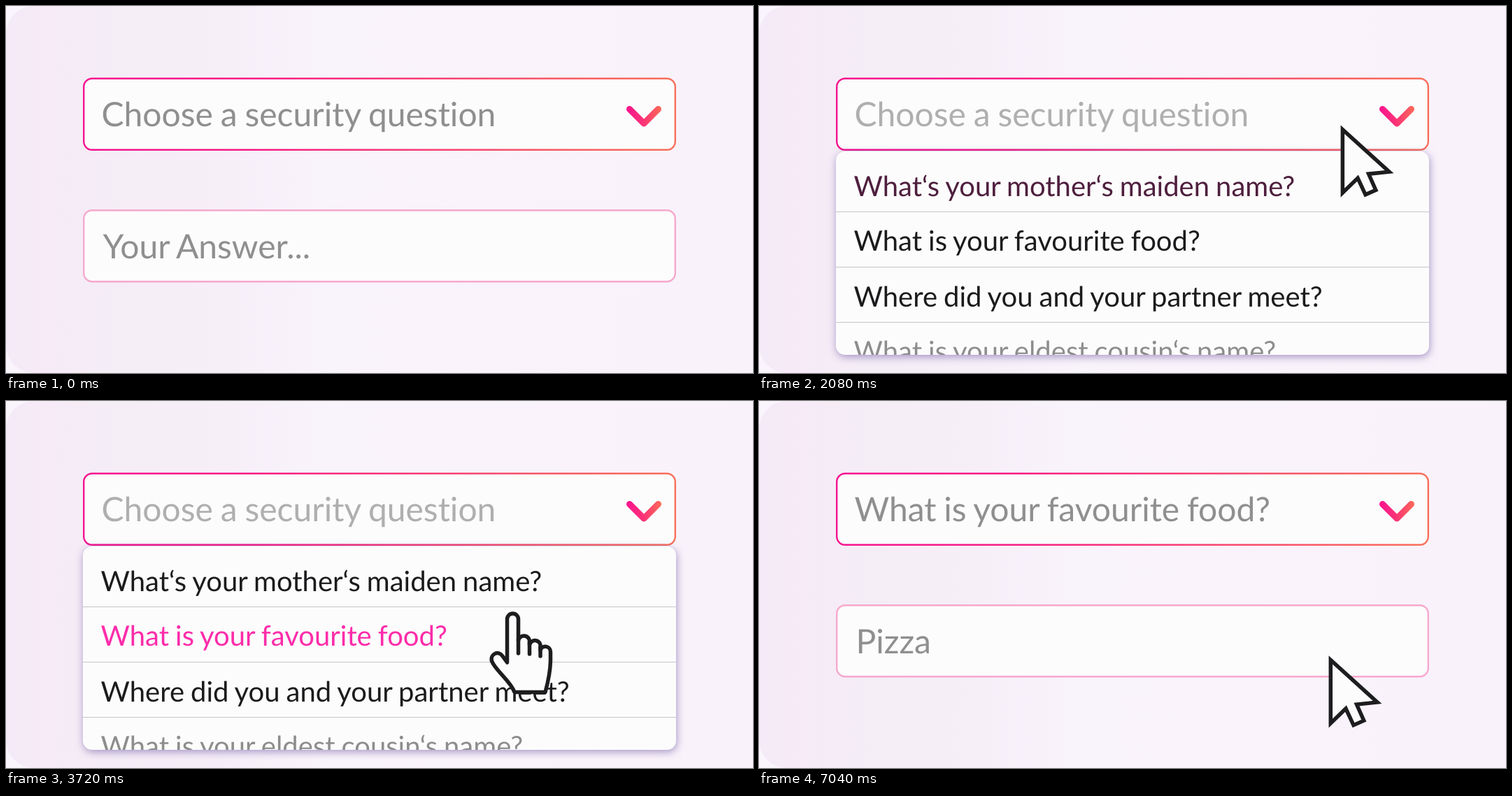
Write an HTML page that moves like this. It is 1068 px wide and 525 px high and loops after 8080 ms.

```html
<!DOCTYPE html>
<html lang="en">
<head>
<meta charset="utf-8">
<title>Security question</title>
<style>
  html, body { margin: 0; width: 100%; height: 100%; overflow: hidden; background: #faf5fc; }
  svg { display: block; width: 100%; height: 100%; }
  text {
    font-family: Lato, sans-serif; font-variant-ligatures: none;
    word-spacing: -.03em; text-rendering: geometricPrecision;
  }
  .field text { font-size: 48px; fill: #8f8f8f; }
  #rows text { font-size: 40px; fill: #1b1b1d; }
  #rows text:last-of-type { fill: #8d8d8d; }
  #rows line { stroke: #c6c5c9; stroke-width: 1.2; vector-effect: non-scaling-stroke; }
  .box { fill: #fcfcfc; stroke-width: 2.4; }
  .pointer { fill: #fcfcfc; stroke: #1d1d1f; stroke-width: 5.5; }
</style>
</head>
<body>
<svg viewBox="0 0 1068 525">
  <defs>
    <linearGradient id="bg" gradientUnits="userSpaceOnUse" x1="0" x2="1068" y1="0" y2="0">
      <stop offset="0" stop-color="#f3ebf8"/>
      <stop offset=".04" stop-color="#f6eaf6"/>
      <stop offset=".14" stop-color="#f4edf6"/>
      <stop offset=".3" stop-color="#f6eff8"/>
      <stop offset=".43" stop-color="#f9f3fb"/>
      <stop offset="1" stop-color="#f9f2fa"/>
    </linearGradient>
    <linearGradient id="edge" gradientUnits="userSpaceOnUse" x1="110" x2="958" y1="0" y2="0">
      <stop offset="0" stop-color="#f6128f"/>
      <stop offset=".3" stop-color="#f61d86"/>
      <stop offset="1" stop-color="#f9705a"/>
    </linearGradient>
    <linearGradient id="tick" gradientUnits="userSpaceOnUse" x1="887" x2="937" y1="0" y2="0">
      <stop offset="0" stop-color="#f9128f"/>
      <stop offset=".5" stop-color="#fb3575"/>
      <stop offset="1" stop-color="#fb6a58"/>
    </linearGradient>
    <filter id="shadow" filterUnits="userSpaceOnUse" x="80" y="185" width="910" height="340"
            color-interpolation-filters="sRGB">
      <feDropShadow dx="1" dy="3" stdDeviation="6" flood-color="#60489a" flood-opacity=".55"/>
    </filter>
    <clipPath id="clip"><rect class="panel" x="110" y="208" width="848" rx="13"/></clipPath>
  </defs>

  <path d="M1068 0H40A40 40 0 0 0 0 40V485A40 40 0 0 0 40 525H1068Z" fill="url(#bg)"/>

  <g class="field">
    <rect class="box" x="111.2" y="103.7" width="845.6" height="102.1" rx="12" stroke="url(#edge)"/>
    <text id="question" x="136.5" y="172"></text>
    <path d="M891.5 147.5L912 168L932.5 147.5" fill="none" stroke="url(#tick)" stroke-width="9"
          stroke-linecap="round" stroke-linejoin="round"/>
  </g>
  <g class="field">
    <rect class="box" x="111.2" y="292.2" width="845.6" height="102" rx="12" stroke="#f7a8cd"/>
    <text id="answer" x="138.5" y="361"></text>
  </g>

  <g id="menu">
    <rect class="panel" x="110" y="208" width="848" rx="13" fill="#fcfcfc" filter="url(#shadow)"/>
    <g clip-path="url(#clip)"><g id="rows"></g></g>
  </g>

  <path id="arrow" class="pointer" stroke-miterlimit="8"
        d="M2.8 6.5V97L24.5 76L35.5 99.7L50.3 93.2L40 70L69.5 67Z"/>
  <g id="hand" class="pointer" stroke-linejoin="round" stroke-linecap="round">
    <path d="M716.5 374V312a8 8 0 0 1 16 0V343a8 8 0 0 1 16 2V349a7.8 7.8 0 0 1 15.5 3V356a7.5 7.5 0 0 1 14.5 3V372Q778 391 771 416.5H727C721 400 700 386 694.5 372C692 362 704 356 710 365Z"/>
    <path fill="none" d="M732.5 341V361M748.5 345V362M764 352V365"/>
  </g>
</svg>
<script>
  const LOOP = 8080, TOP = 208, HEIGHT = 291;
  const BLACK = [27, 27, 29], PINK = [253, 44, 170];
  const CHOICES = [
    ['What‘s your mother‘s maiden name?', 272],
    ['What is your favourite food?', 350],
    ['Where did you and your partner meet?', 430],
    ['What is your eldest cousin‘s name?', 508]
  ];
  const LINES = [294.5, 373.5, 452.5];

  // start, end, target x, target y
  const MOVES = [
    [400, 1240, 823, 138.5],
    [1880, 2385, 848, 231],
    [3000, 3360, 698, 308],
    [3960, 4440, 559, 334],
    [5560, 5920, 814.5, 364]
  ];
  const KEYS = [6320, 6480, 6640, 6880, 7040];

  const $ = id => document.getElementById(id);
  const ramp = (t, a, b) => Math.min(1, Math.max(0, (t - a) / (b - a)));
  const ease = (t, a, b) => (1 - Math.cos(Math.PI * ramp(t, a, b))) / 2;
  const mix = (a, b, p) => a + (b - a) * p;
  const tint = p => `rgb(${BLACK.map((c, i) => Math.round(mix(c, PINK[i], p)))})`;
  const show = (el, on) => { el.style.display = on ? '' : 'none'; };

  $('rows').innerHTML =
    LINES.map(y => `<line x1="110" x2="958" y1="${y}" y2="${y}"/>`).join('') +
    CHOICES.map(([s, y]) => `<text x="135.5" y="${y}">${s}</text>`).join('');
  const rows = $('rows').querySelectorAll('text');
  const panels = document.querySelectorAll('.panel');

  function drawMenu(t) {
    const open = ease(t, 1515, 1640) - ease(t, 3840, 4000);
    show($('menu'), open > 0.005);
    panels.forEach(p => p.setAttribute('height', HEIGHT * open));
    $('rows').setAttribute('transform', `translate(0 ${TOP * (1 - open)}) scale(1 ${open})`);
    rows[0].style.fill = tint(ease(t, 1880, 2520) - ease(t, 3000, 3400));
    rows[1].style.fill = tint(ease(t, 3320, 3700));
  }

  function drawFields(t) {
    $('question').textContent = t < 3840 ? 'Choose a security question' : CHOICES[1][0];
    $('question').style.opacity = 1 - 0.3 * (ramp(t, 1240, 1400) - ramp(t, 3840, 4000));
    const typed = KEYS.filter(k => t >= k).length;
    $('answer').textContent = t < 5200 ? 'Your Answer...' : 'Pizza'.slice(0, typed);
    $('answer').style.opacity = t < 5200 ? 1 - ramp(t, 5000, 5200) : 1;
  }

  function drawPointer(t) {
    let x = 1068, y = 256;
    for (const [a, b, tx, ty] of MOVES) {
      const p = ease(t, a, b);
      x = mix(x, tx, p);
      y = mix(y, ty, p);
    }
    const pointing = t >= 3360 && t < 3960;
    $('arrow').setAttribute('transform', `translate(${x} ${y})`);
    show($('arrow'), t > 400 && !pointing);
    show($('hand'), pointing);
  }

  const start = performance.now();
  function frame() {
    const t = (performance.now() - start) % LOOP;
    drawMenu(t);
    drawFields(t);
    drawPointer(t);
    requestAnimationFrame(frame);
  }
  frame();
</script>
</body>
</html>
```
